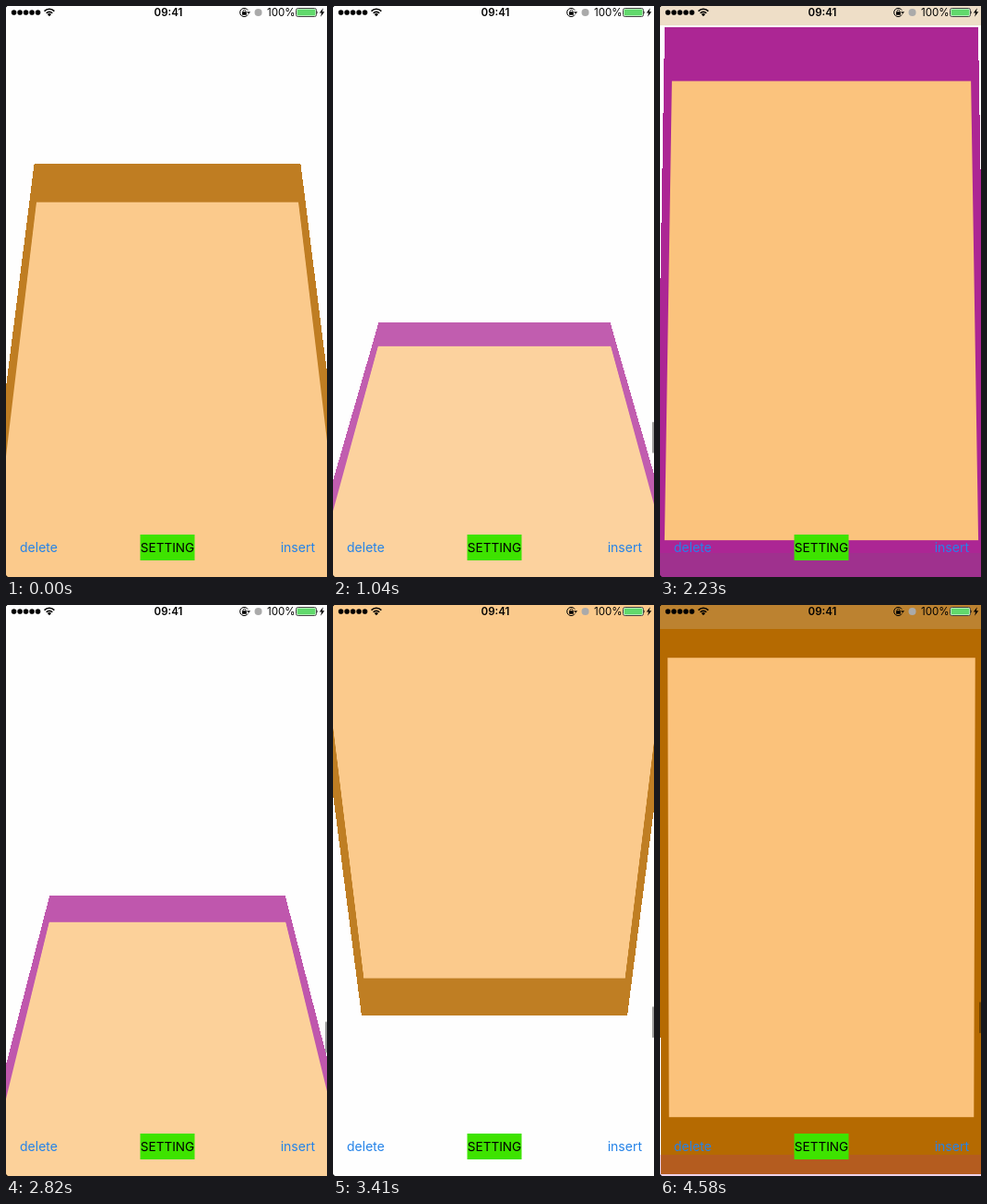
An HTML page for the animation above (4.68 s loop, 348 by 619 pixels).

```html
<!DOCTYPE html>
<html lang="en">
<head>
<meta charset="utf-8">
<title>Card pager</title>
<style>
  html, body { margin: 0; width: 100%; height: 100%; overflow: hidden; background: #fff; }
  #stage { position: relative; width: 348px; height: 619px; overflow: hidden; background: #fefefe; }
  .card {
    position: absolute; left: 0; top: -1.5px; width: 350px; height: 622px;
    box-sizing: border-box; border: solid; border-width: 62px 9.5px; background: #fbc27a;
  }
  #ui { position: absolute; inset: 0; z-index: 1000; font-family: Inter, Roboto, sans-serif; }
  #bar {
    position: absolute; left: 345.5px; top: 0; width: 2px; height: 33.5px;
    border-radius: 1px; background: rgba(0, 0, 0, .37);
  }
  svg { position: absolute; inset: 0; }
</style>
</head>
<body>
<div id="stage">
  <div id="ui">
    <div id="bar"></div>
    <svg width="348" height="619">
      <path d="M0 0h1.5L0 1.5zM0 616.5Q.5 618.5 2.5 619H0z"/>
      <g id="dots"></g>
      <g fill="none" stroke="#000" stroke-width="1.6">
        <path d="M41.6 5.6a7.4 7.4 0 0 1 10.8 0M43.7 7.8a4.6 4.6 0 0 1 6.6 0"/>
        <path d="M262.2 4.6A4.6 4.6 0 1 0 262.2 9.4" stroke-width="1"/>
        <path d="M257 6.5V5.6a1.4 1.4 0 0 1 2.8 0v.9" stroke-width=".8"/>
      </g>
      <path d="M44.9 9.1a3 3 0 0 1 4.2 0L47 11.2zM256 6.3h4.8v3.5H256zM261 6.2h4l-2 2.5z"/>
      <circle cx="273.5" cy="7" r="4" fill="#aaa"/>
      <rect x="314.5" y="2.5" width="22" height="9" rx="2" fill="#fff" stroke="#333" stroke-width=".9"/>
      <rect x="315.5" y="3.5" width="20" height="7" rx="1" fill="#61d96c"/>
      <path d="M337.3 5.2q1.4 1.8 0 3.6zM343.8 2.2l-4 5.4h2.3l-1 4.2 4.2-5.6h-2.4z"/>
      <text x="176" y="11" font-size="11.5" font-weight="600" text-anchor="middle">09:41</text>
      <text x="283" y="11" font-size="11.5">100%</text>
      <rect x="145.5" y="573" width="59" height="28" fill="#3ee300"/>
      <g font-size="14">
        <text x="175" y="592.3" font-size="13.6" text-anchor="middle">SETTING</text>
        <text x="15" y="592.3" fill="#2583e8">delete</text>
        <text x="335" y="592.3" fill="#2583e8" text-anchor="end">insert</text>
      </g>
    </svg>
  </div>
</div>
<script>
const LOOP = 4680, STEP = 147.7, STEPS = 32, PAGE = 622;
const stage = document.getElementById('stage');
const bar = document.getElementById('bar');

document.getElementById('dots').innerHTML =
  [0, 1, 2, 3, 4].map(i => `<circle cx="${8.6 + i * 6.5}" cy="7" r="2.8"/>`).join('');

// Border colours of pages -1 to 2.
const cards = ['#dce6f0', '#b56900', '#ab2192', '#5f5a73'].map((color, i) => {
  const el = document.createElement('div');
  el.className = 'card';
  el.style.borderColor = color;
  stage.append(el);
  return { el, page: i - 1 };
});

// Scroll position in pages: [step, page]
const keys = [
  [0, -.1655], [4, .18], [7, .671], [9, .865], [11, .95], [13, .985],
  [15, .977], [19, .697], [23, .1685], [27, .032], [31, .0043]
];

function slope(i) {
  const a = keys[Math.max(i - 1, 0)], b = keys[Math.min(i + 1, keys.length - 1)];
  return (b[1] - a[1]) / (b[0] - a[0]);
}

// Cubic Hermite through the keys.
function scrollAt(step) {
  let i = 0;
  while (i < keys.length - 2 && step >= keys[i + 1][0]) i++;
  const [x0, y0] = keys[i], [x1, y1] = keys[i + 1];
  const w = x1 - x0, u = (step - x0) / w, v = 1 - u;
  return v * v * ((1 + 2 * u) * y0 + u * w * slope(i))
       + u * u * ((3 - 2 * u) * y1 - v * w * slope(i + 1));
}

function draw(time) {
  const step = Math.min(STEPS - 1, Math.floor(time % LOOP / STEP));
  const pos = scrollAt(step);
  for (const { el, page } of cards) {
    const q = page - pos, far = Math.abs(q);
    el.style.display = far < 1.2 ? '' : 'none';
    el.style.opacity = 1 - .8 * far;
    el.style.zIndex = Math.round(far * 100);
    el.style.transform = `translateY(${q * PAGE}px) perspective(500px) rotateX(${q * 120}deg)`;
  }
  bar.style.transform = `translateY(${430 + 31 * pos}px)`;
  bar.style.opacity = step === 0 || (step > 13 && step < 17) ? 0 : 1;
}

const start = performance.now();
(function tick() {
  draw(performance.now() - start);
  requestAnimationFrame(tick);
})();
</script>
</body>
</html>
```
